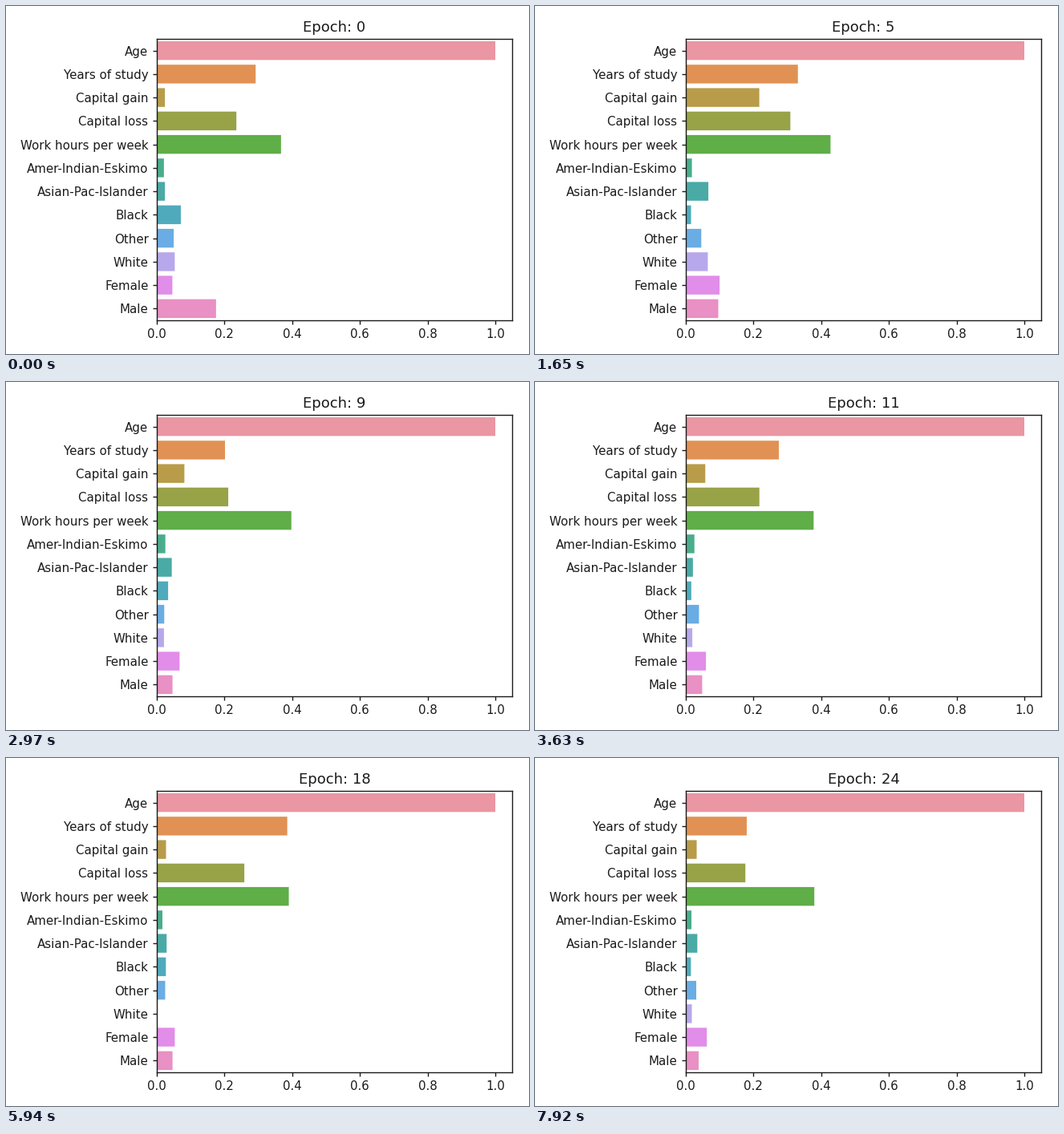
Recreate the animation shown at these times as a matplotlib script. Size 652 px wide and 434 px high, loop 8000 ms.

```python
import numpy as np
import matplotlib.pyplot as plt
from matplotlib.animation import FuncAnimation

W, H, DPI = 652, 434, 100
LEFT, TOP, RIGHT, BOTTOM = 188, 41, 631, 392   # plot area in pixels
UNIT = 422                                     # pixels per 1.0 on the x axis
LOOP, STEP, TICK = 8000, 330, 40               # ms: loop, epoch, drawing interval
PEAK, DECAY, PERIOD, CREST = 2, 3, 15, 15.5    # in epochs
INK = "#1a1a1a"

# label, colour, importance at the start, at the early peak and once settled
BARS = [
    ("Age", "#ea96a3", 1, 1, 1),
    ("Years of study", "#e19153", .292, .429, .31),
    ("Capital gain", "#b89c49", .024, .538, .03),
    ("Capital loss", "#98a246", .235, .479, .235),
    ("Work hours per week", "#60ae47", .367, .531, .378),
    ("Amer-Indian-Eskimo", "#4aad8b", .021, .028, .015),
    ("Asian-Pac-Islander", "#4aaaa5", .024, .142, .025),
    ("Black", "#4fabbc", .071, .018, .025),
    ("Other", "#6aade4", .05, .1, .025),
    ("White", "#b7a8eb", .053, .139, .01),
    ("Female", "#e18de9", .046, .167, .057),
    ("Male", "#e990c4", .175, .203, .04),
]
SWING = {"Years of study": .14, "Capital loss": .065}
labels, colors, start, peak, settled = zip(*BARS)
start, peak, settled = map(np.array, (start, peak, settled))
swing = np.array([SWING.get(label, 0) for label in labels])


def pt(px):
    return px * 72 / DPI


def widths(epoch):
    """Rise to the early peak, then decay to a swinging, slightly noisy level."""
    early = start + (peak - start) * min(epoch / PEAK, 1)
    noise = np.random.default_rng(epoch).uniform(-.012, .012, len(BARS))
    noise[0] = 0
    level = settled + swing * np.cos(2 * np.pi * (epoch - CREST) / PERIOD) + noise
    fade = np.exp(-max(epoch - PEAK, 0) / DECAY)
    return np.maximum(level + (early - level) * fade, 0)


plt.rcParams.update({"font.family": "DejaVu Sans", "font.size": pt(15),
                     "axes.linewidth": pt(1.4), "axes.edgecolor": INK,
                     "text.color": INK, "xtick.color": INK, "ytick.color": INK})
fig = plt.figure(figsize=(W / DPI, H / DPI), dpi=DPI, facecolor="white")
ax = fig.add_axes([LEFT / W, 1 - BOTTOM / H, (RIGHT - LEFT) / W, (BOTTOM - TOP) / H])

rows = np.arange(len(BARS))
bars = ax.barh(rows, start, height=0.8, color=colors, snap=False)
ax.set_xlim(0, (RIGHT - LEFT) / UNIT)
ax.set_ylim(len(rows) - 0.5, -0.5)
ax.set_yticks(rows, labels)
ax.set_xticks(np.arange(6) / 5)
ax.tick_params(length=pt(5), width=pt(1.4), pad=pt(5.5))
title = ax.set_title("Epoch: 0", fontsize=pt(18), pad=pt(9))


def draw(i):
    epoch = (i * TICK + TICK - 1) // STEP
    title.set_text(f"Epoch: {epoch}")
    for bar, width in zip(bars, widths(epoch)):
        bar.set_width(width)
    return [title, *bars]


anim = FuncAnimation(fig, draw, frames=LOOP // TICK, interval=TICK,
                     init_func=lambda: draw(0), repeat=True, repeat_delay=0)
plt.show()
```
